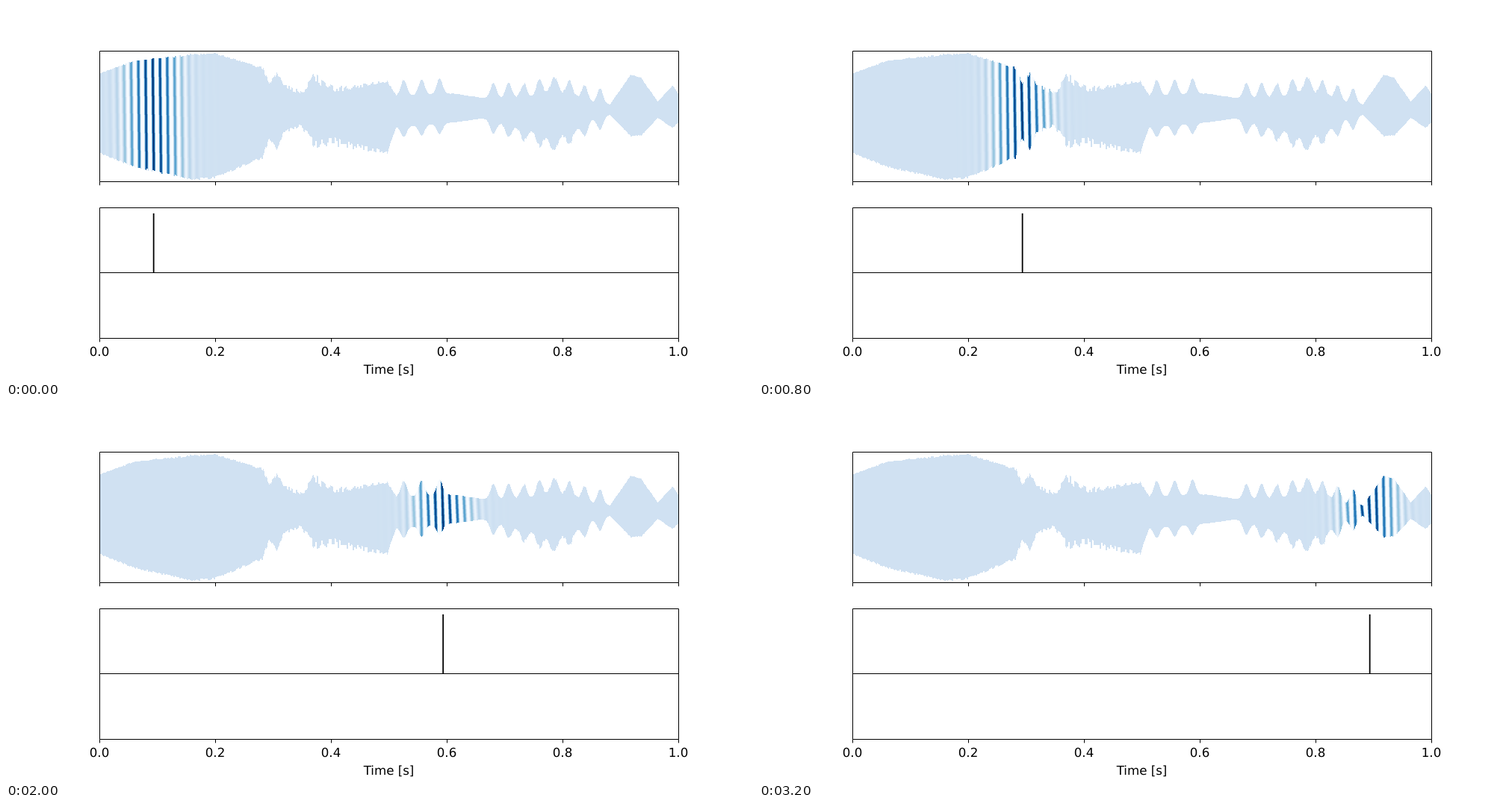
An HTML page with a canvas for the animation above (3250 ms loop, 1000 by 500 pixels).

```html
<!DOCTYPE html>
<html lang="en">
<head>
<meta charset="utf-8">
<title>Moving wavelet over a waveform</title>
<style>
  html, body { margin: 0; width: 100%; height: 100%; overflow: hidden; background: #fff; }
  canvas, svg { position: absolute; left: 0; top: 0; width: 1000px; height: 500px; }
  text { font: 16.667px "DejaVu Sans", sans-serif; text-anchor: middle; text-rendering: geometricPrecision; }
  path { fill: none; stroke: #000; }
</style>
</head>
<body>
<canvas id="plot" width="1000" height="500"></canvas>
<svg viewBox="0 0 1000 500">
  <path id="axes"/>
  <g id="labels"></g>
  <text x="512.5" y="493">Time [s]</text>
</svg>
<script>
const LEFT = 125, WIDTH = 775, MID = 138;
const FRAME_MS = 50, FRAMES = 65;
const STEP = WIDTH / 80;            // wavelet period and shift per frame
const SIGMA = 0.03 * WIDTH;
const LEAN = 1.6;                   // sideways drift of a stripe, top to bottom
const PARTS = 6;

// Loudness of the sound: x, height above and below the middle.
const LEVELS = [
  [125, 48, 60], [172, 66, 79], [250, 74, 96], [280, 75, 93], [343, 57, 67],
  [352, 36, 42], [362, 52, 58], [372, 34, 33], [395, 24, 26], [412, 50, 54],
  [440, 30, 52], [510, 38, 60], [522, 18, 25], [600, 21, 18], [638, 15, 13],
  [700, 16, 30], [732, 28, 46], [785, 9, 14], [808, 6, 8], [836, 47, 37],
  [850, 42, 36], [872, 10, 12], [892, 32, 26], [900, 20, 18]
];
// Trains of equally spaced swells.
const TRAINS = [
  { start: 532, gap: 24, count: 3, up: 21, down: 14 },
  { start: 652, gap: 20.4, count: 8, up: 20, down: 17 }
];
const BLUES = ['f7fbff', 'deebf7', 'c6dbef', '9ecae1', '6baed6', '4292c6', '2171b5', '08519c', '08306b']
  .map(h => [0, 2, 4].map(i => parseInt(h.slice(i, i + 2), 16)));

const ctx = document.getElementById('plot').getContext('2d');

const gauss = (d, width) => Math.exp(-d * d / (2 * width * width));
const lerp = (a, b, k) => a + (b - a) * k;

function noise(n) {
  const s = Math.sin(n * 127.1 + 11.7) * 43758.5453;
  return s - Math.floor(s);
}

function blues(v) {
  const p = Math.max(0, Math.min(1, v)) * 8;
  const i = Math.min(7, Math.floor(p));
  return `rgb(${BLUES[i].map((c, j) => Math.round(lerp(c, BLUES[i + 1][j], p - i)))})`;
}

function outline(x) {
  const i = LEVELS.findIndex(level => level[0] > x);
  const [a, b] = [LEVELS[i - 1], LEVELS[i]];
  const k = (x - a[0]) / (b[0] - a[0]);
  let up = lerp(a[1], b[1], k), down = lerp(a[2], b[2], k);
  for (const t of TRAINS) {
    for (let n = 0; n < t.count; n++) {
      const swell = gauss(x - t.start - n * t.gap, 4);
      up += t.up * swell;
      down += t.down * swell;
    }
  }
  const rough = 0.03 + 0.25 * gauss(x - 425, 45) + 0.1 * gauss(x - 725, 35);
  const cell = Math.floor(x / 2);
  return {
    x,
    top: MID - up * (1 - rough * noise(cell)),
    bottom: MID + down * (1 - rough * noise(cell + 1000))
  };
}

const columns = Array.from({ length: WIDTH }, (_, i) => outline(LEFT + i));

function drawWave(center) {
  for (const { x, top, bottom } of columns) {
    for (let j = 0; j < PARTS; j++) {
      const d = x + 1 - center - LEAN * ((j + 0.5) / PARTS - 0.5);
      const y0 = Math.round(lerp(top, bottom, j / PARTS));
      const y1 = Math.round(lerp(top, bottom, (j + 1) / PARTS));
      ctx.fillStyle = blues(0.2 + 0.8 * gauss(d, SIGMA) * Math.cos(2 * Math.PI * d / STEP));
      ctx.fillRect(x, y0, 1, y1 - y0);
    }
  }
}

function line(x0, y0, x1, y1, width) {
  ctx.lineWidth = width;
  ctx.beginPath();
  ctx.moveTo(x0, y0);
  ctx.lineTo(x1, y1);
  ctx.stroke();
}

function buildAxes() {
  const svg = document.querySelector('svg');
  let d = '';
  for (const y of [60.5, 270.5]) d += `M125.5 ${y}H900.5v175H125.5z`;
  for (let i = 0; i <= 5; i++) {
    const x = LEFT + i * 155;
    d += `M${x + 0.5} 235.5v4.86M${x + 0.5} 445.5v4.86`;
    const label = document.createElementNS(svg.namespaceURI, 'text');
    label.setAttribute('x', x);
    label.setAttribute('y', 469);
    label.textContent = (i / 5).toFixed(1);
    document.getElementById('labels').append(label);
  }
  document.getElementById('axes').setAttribute('d', d);
}

let shown = -1;
function tick() {
  const frame = Math.floor(performance.now() / FRAME_MS) % FRAMES;
  if (frame !== shown) {
    shown = frame;
    const center = LEFT + (7.5 + frame) * STEP;
    ctx.clearRect(0, 0, 1000, 500);
    drawWave(center);
    line(LEFT, 357.5, LEFT + WIDTH, 357.5, 1.2);
    line(center, 357.5, center, 278, 1.8);
  }
  requestAnimationFrame(tick);
}

buildAxes();
tick();
</script>
</body>
</html>
```
